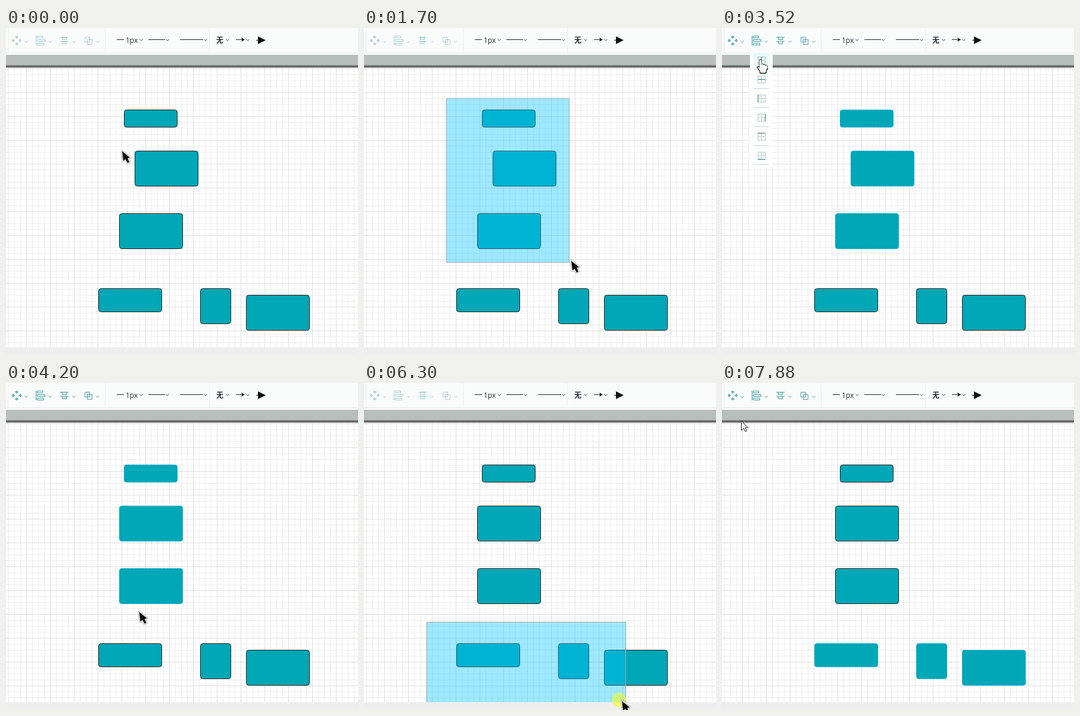
An HTML page with a canvas for the animation above (8 s loop, 591 px wide and 549 px high).

```html
<!DOCTYPE html>
<html lang="zh">
<head>
<meta charset="utf-8">
<title>Align shapes</title>
<style>
html, body { margin: 0; width: 100%; height: 100%; overflow: hidden; background: #fff; }
canvas { display: block; }
</style>
</head>
<body>
<canvas id="stage" width="591" height="549"></canvas>
<script>
const W = 591, H = 549, TOP = 67, FLOOR = 536;
const LOOP = 8000, STEP = 131.2, LEAD = 24, LAST = 60;
const g = document.getElementById('stage').getContext('2d');

// Key points of the pointer: step, x, y
const path = [
  [0, 195, 207], [4, 147, 126], [6, 173, 188], [7, 255, 292], [10, 338, 398],
  [12, 350, 395], [13, 348, 391], [21, 58, 22], [24, 58, 22], [27, 65, 53],
  [29, 65, 53], [33, 253, 446], [38, 125, 415], [40, 120, 410], [42, 110, 402],
  [46, 283, 498], [47, 445, 540], [48, 433, 534], [52, 546, 523], [58, 312, 266],
  [60, 32, 63]
];
const drags = [
  { x: 138, y: 118, from: 5, to: 13 },
  { x: 105, y: 401, from: 42, to: 53 }
];
const REACH = 21, OPEN = 23, CLICK = 29;

const boxes = [
  [198, 137, 90, 30], [216, 206, 107, 60], [190, 311, 107, 60],
  [155, 437, 107, 40], [326, 437, 52, 60], [403, 448, 107, 60]
];

function pointer(k) {
  const i = Math.max(1, path.findIndex(p => p[0] >= k));
  const [k0, x0, y0] = path[i - 1], [k1, x1, y1] = path[i];
  const u = (k - k0) / (k1 - k0), e = u * u * (3 - 2 * u);
  return [x0 + (x1 - x0) * e, y0 + (y1 - y0) * e];
}

function rect(x, y, w, h, color) {
  g.fillStyle = color;
  g.fillRect(x, y, w, h);
}

function frame(x, y, w, h, color) {
  g.strokeStyle = color;
  g.lineWidth = 1;
  g.strokeRect(x + .5, y + .5, w - 1, h - 1);
}

function trace(points, x, y) {
  g.beginPath();
  points.forEach(p => g.lineTo(x + p[0], y + p[1]));
}

function outline(color, width) {
  g.strokeStyle = color;
  g.lineWidth = width;
  g.stroke();
}

function fill(color) {
  g.fillStyle = color;
  g.fill();
}

function chevron(x, y, color) {
  trace([[-2.5, -1.5], [0, 1.5], [2.5, -1.5]], x, y);
  outline(color, 1);
}

function grid() {
  const tone = major => major ? '#dfdfdf' : '#ececec';
  rect(0, TOP, W, FLOOR - TOP, '#fff');
  for (let x = 4; x < W; x += 10) rect(x, TOP, 1, FLOOR - TOP, tone(x % 40 === 34));
  for (let y = 68; y < FLOOR; y += 10) rect(0, y, W, 1, tone(y % 40 === 28));
}

function shape(x, y, w, h, selected) {
  g.beginPath();
  g.roundRect(x + .5, y + .5, w - 1, h - 1, 4);
  fill('#00a7b6');
  outline(selected ? '#00a7b6' : '#2a1a17', 1);
  if (!selected) return;
  g.setLineDash([3, 3]);
  outline('#12b2e6', 1);
  g.setLineDash([]);
}

function editIcons(active) {
  const c = '#369ba0';
  g.globalAlpha = active ? 1 : .45;
  for (let i = 0; i < 4; i++) {
    g.save();
    g.translate(18, 21);
    g.rotate(i * Math.PI / 2);
    chevron(0, -5.5, c);
    g.scale(1, -1);
    chevron(0, 6.5, c);
    rect(-.5, 3, 1, 4, c);
    g.restore();
  }
  rect(50, 13, 1, 16, c);
  [10, 14, 12].forEach((w, i) => frame(52, 13 + 6 * i, w, 4, c));
  [15, 22].forEach(y => {
    rect(91, y, 14, 1, c);
    frame(94, y, 8, 5, c);
  });
  [[132, 15], [136, 19]].forEach(([x, y]) => frame(x, y, 9, 9, '#4e9cc4'));
  for (let x = 34; x < 160; x += 40) chevron(x, 23, '#5ca6b8');
  g.globalAlpha = 1;
}

function toolbar(active, hover) {
  rect(0, 0, W, 45, '#fafbfb');
  rect(0, 41, W, 1, '#e2efec');
  rect(0, 45, W, 17, '#b7bebc');
  const edge = g.createLinearGradient(0, 62, 0, TOP);
  ['#a4aaa8', '#686868', '#606060', '#c8c8c8'].forEach((c, i) => edge.addColorStop(i / 3, c));
  rect(0, 62, W, TOP - 62, edge);
  [3, 166, 341].forEach(x => rect(x, 0, 1, 40, '#eceeee'));
  if (hover) rect(47, 6, 38, 32, '#eafafa');
  editIcons(active);

  const ink = '#20262b';
  [[186, 12], [239, 28], [292, 39], [386, 12]].forEach(([x, w]) => rect(x, 19, w, 1, ink));
  [227, 271, 335, 372, 406].forEach(x => chevron(x, 20, '#4a5055'));
  g.fillStyle = '#1e2a38';
  g.font = '12px "Open Sans", "Noto Sans", sans-serif';
  g.fillText('1px', 201, 25);
  g.font = 'bold 12px "Noto Sans CJK SC", "Noto Sans CJK", sans-serif';
  g.fillText('无', 353, 25);
  trace([[0, -3.5], [6, 0], [0, 3.5], [1.5, 0]], 395, 19.5);
  fill('#111');
  trace([[0, -6.5], [13, 0], [0, 6.5]], 423, 20.5);
  fill('#111');
  rect(420, 20, 4, 1, '#111');
}

function menu(hover) {
  rect(47, 38, 38, 196, '#fdfefe');
  if (hover) rect(53, 41, 27, 28, '#eafafa');
  [6, 6, 0, 12, 0, 12].forEach((at, i) => {
    const y = 48 + 32 * i;
    for (let a = 0; a < 13; a += 2)
      for (let b = 0; b < 13; b += 2)
        if (a % 6 === 0 || b % 6 === 0) rect(60 + a, y + b, 1, 1, '#66898a');
    if ('vhvvhh'[i] === 'v') rect(60 + at, y, 1, 13, '#176f70');
    else rect(60, y + at, 13, 1, '#176f70');
    rect(53, y + 21, 26, 1, '#bfd9d5');
  });
}

// The marquee trails the pointer by one step.
function marquee({ x, y }, k) {
  const [px, py] = pointer(k - 1);
  const w = Math.round(px - 5) - x, h = Math.round(py - 1) - y;
  rect(x, y, w, h, 'rgba(0,198,255,.38)');
  frame(x, y, w, h, '#98a9ad');
}

function halo(x, y) {
  g.beginPath();
  g.arc(x, y, 12, 0, 7);
  fill('rgba(255,255,0,.52)');
}

function darkArrow(x, y) {
  trace([[0, 0], [2, 16], [5.5, 13], [9, 19.5], [12, 18], [9, 11.5], [13, 10.5]], x, y);
  g.closePath();
  outline('rgba(150,150,150,.4)', 5);
  outline('#dedede', 2.4);
  fill('#0c0c0c');
}

function lightArrow(x, y) {
  trace([[0, 0], [0, 16], [4, 12.5], [6.5, 18], [9, 17], [6.5, 11.5], [11, 11.5]], x + .5, y + .5);
  g.closePath();
  fill('#fff');
  outline('#1c1c2c', 1);
}

function hand(x, y) {
  g.beginPath();
  [0, 7.5, 8.5, 10].forEach((top, i) => g.roundRect(x - 2 + 3.3 * i, y + top, 3.3, 17 - top, 1.6));
  outline('#161616', 1.3);
  fill('#fff');
  trace([[-2, 13], [-4, 11.5], [-6, 12.5], [-1.5, 20], [-1, 23], [8.5, 23], [11, 15]], x, y);
  fill('#fff');
  outline('#161616', 1.3);
}

function draw(k) {
  const [x, y] = pointer(k);
  const [first, second] = drags;
  const upper = k > first.to && k < second.from, lower = k > second.to;
  grid();
  boxes.forEach(([bx, by, w, h], i) => {
    const left = i === 1 && k >= CLICK ? 190 : bx;
    shape(left, by, w, h, i < 3 ? upper : lower);
  });
  drags.forEach(d => { if (k > d.from && k <= d.to) marquee(d, k); });
  rect(0, FLOOR, W, H - FLOOR, '#eee');
  toolbar(upper || lower, k >= REACH && k < 26);
  if (k >= OPEN && k <= CLICK) menu(k >= 26);

  if (k === CLICK || drags.some(d => k >= d.from && k < d.to)) halo(x - 5, y - 2);
  if (k >= REACH && k <= CLICK) hand(x, y);
  else if (y < TOP) lightArrow(x, y);
  else darkArrow(x, y);
}

g.lineJoin = 'round';
const origin = performance.now();
let shown = -1;
function tick() {
  const t = (performance.now() - origin) % LOOP;
  const k = Math.min(LAST, Math.floor((t + LEAD) / STEP));
  if (k !== shown) draw(shown = k);
  requestAnimationFrame(tick);
}
tick();
</script>
</body>
</html>
```
